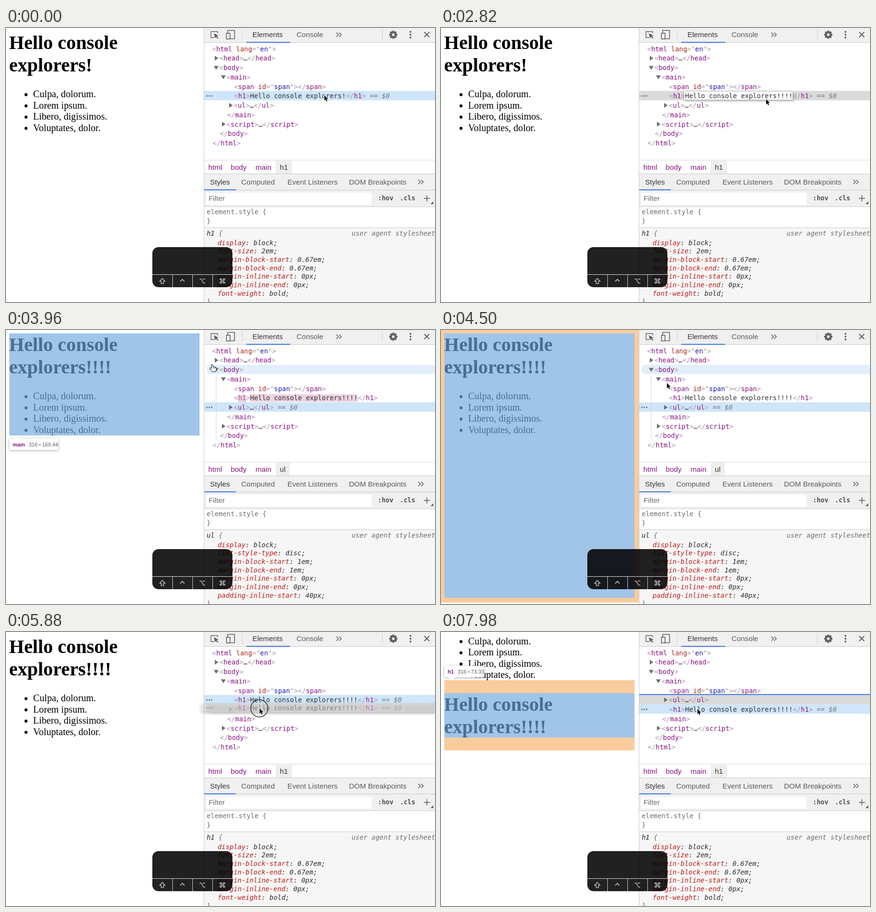
Animation, 900 px wide and 574 px high, one loop 8 s. Source, as an HTML page with a canvas:

```html
<!DOCTYPE html>
<html lang="en">
<head>
<meta charset="utf-8">
<title>Editing the DOM</title>
<style>
html, body { margin: 0; width: 100%; height: 100%; overflow: hidden; background: #fff; }
canvas { display: block; width: 900px; height: 574px; }
</style>
</head>
<body>
<canvas id="stage" width="900" height="574"></canvas>
<script>
const g = document.getElementById('stage').getContext('2d');
const LOOP = 8000, STEP = 60, LEFT = 416, ROW = 19.75, TOP = 33.75, CHAR = 8.37;
const MONO = '13.9px "DejaVu Sans Mono", monospace';
const SANS = '15.3px "Liberation Sans", Arial, sans-serif';
const SERIF = '"Liberation Serif", "Times New Roman", serif';
const CONTENT = 'rgba(111,168,220,.66)', MARGIN = 'rgba(246,178,107,.66)', PADDING = 'rgba(147,196,125,.55)';
const BAR = '#f0f0f0', EDGE = '#cacaca', BLUE = '#3b78e0';

// Moments of the story, in ms
const EDIT = 840, CARET = 1320, TYPED = [1560, 1860, 2160], COMMIT = 3240;
const GRAB = 5520, DROP = 6690, FADE = 1250;

// time, x, y of the pointer tip
const PATH = [
  [0, 668, 141], [480, 676, 144], [840, 676, 144], [2400, 676, 144], [2760, 682, 149],
  [2880, 682, 149], [3160, 640, 160], [3360, 640, 160], [3900, 432, 74], [4020, 432, 74],
  [4260, 440, 82], [4500, 474, 111], [4980, 530, 141], [5580, 531, 143], [5880, 532, 160],
  [6480, 531, 177], [7160, 531, 177], [7400, 538, 161], [8000, 538, 161]
];
// time, hovered tree row, element highlighted on the page
const HOVER = [
  [0, '', ''], [60, '', 'h1'], [720, '', ''], [3060, '', 'ul'], [3420, 'h1', 'h1'], [3600, 'span', ''],
  [3780, 'main', 'main'], [3900, 'body', 'main'], [4240, 'body', 'body'], [4560, 'main', 'main'],
  [4700, 'span', ''], [4860, 'h1', 'h1'], [5400, '', ''], [7260, '', 'main'], [7380, '', 'h1']
];
const PRESSES = [[600, 670], [740, 810], [3180, 3300], [5400, DROP]];

const between = (t, a, b) => t >= a && t < b;

function box(x, y, w, h, color) {
  g.fillStyle = color;
  g.fillRect(x, y, w, h);
}

function text(s, x, y, color, font) {
  if (font) g.font = font;
  g.fillStyle = color;
  g.fillText(s, x, y);
}

function shape(points, fill, stroke, width = 1, open = false) {
  g.beginPath();
  points.forEach(([x, y], i) => i ? g.lineTo(x, y) : g.moveTo(x, y));
  if (!open) g.closePath();
  g.lineWidth = width;
  if (stroke) { g.strokeStyle = stroke; g.stroke(); }
  if (fill) { g.fillStyle = fill; g.fill(); }
}

const line = (points, color, width) => shape(points, null, color, width, true);

function rounded(x, y, w, h, r, color) {
  g.beginPath();
  g.roundRect(x, y, w, h, r);
  g.fillStyle = color;
  g.fill();
}

function shadowed(blur, dy, alpha, draw) {
  g.save();
  g.shadowColor = `rgba(0,0,0,${alpha})`;
  g.shadowBlur = blur;
  g.shadowOffsetY = dy;
  draw();
  g.restore();
}

function pointer(t) {
  let i = PATH.findIndex(p => p[0] > t);
  if (i < 0) i = PATH.length - 1;
  const a = PATH[i - 1], b = PATH[i], k = (t - a[0]) / (b[0] - a[0]), e = k * k * (3 - 2 * k);
  return [a[1] + (b[1] - a[1]) * e, a[2] + (b[2] - a[2]) * e];
}

function stateAt(t) {
  const typed = TYPED.filter(at => t >= at).length;
  const [, row, lit] = HOVER.filter(h => h[0] <= t).pop();
  return {
    t, row, lit, swapped: t >= DROP,
    marks: '!'.repeat(1 + typed),
    pageMarks: t >= COMMIT ? '!!!!' : '!',
    selected: between(t, COMMIT, 5400) ? 'ul' : 'h1',
    editing: between(t, EDIT, COMMIT)
  };
}

function page(s) {
  const h = s.swapped ? 121 : 0, l = s.swapped ? -119.5 : 0;
  box(0, 0, 900, 574, '#fff');
  text('Hello console', 6.5, 44 + h, '#000', 'bold 40.4px ' + SERIF);
  text('explorers' + s.pageMarks, 6.5, 90.5 + h, '#000');
  g.font = '20.2px ' + SERIF;
  ['Culpa, dolorum.', 'Lorem ipsum.', 'Libero, digissimos.', 'Voluptates, dolor.'].forEach((item, i) => {
    const y = 145 + l + i * 23.5;
    text(item, 57, y, '#000');
    g.beginPath();
    g.arc(42, y - 5.3, 3.1, 0, 7);
    g.fill();
  });
}

function tooltip(tag, size, top, bottom) {
  const above = top > 40, y = above ? top - 30 : bottom + 6.5, edge = above ? y + 24 : y;
  const bold = 'bold 11px "Liberation Sans", Arial, sans-serif';
  g.font = bold;
  const x = 14 + g.measureText(tag).width + 8;
  const w = x + 27.5 + g.measureText(size).width - 6;
  shadowed(5, 1, .35, () => rounded(7, y, w, 24, 3, '#fff'));
  shape([[15, edge], [22, edge + (above ? 6 : -6)], [29, edge]], '#fff');
  text(tag, 14, y + 16, '#881280', bold);
  text('316', x, y + 16, '#5a5a5a', bold.slice(5));
  text('×', x + 20, y + 16, '#777');
  text(size, x + 28, y + 16, '#5a5a5a');
}

function highlight(s) {
  const W = 399, h = s.swapped ? 128 : 7, u = s.swapped ? 7 : 127;
  if (s.lit === 'h1') {
    box(7, h - 27, W, 27, MARGIN);
    box(7, h, W, 93, CONTENT);
    box(7, h + 93, W, 27, MARGIN);
    tooltip('h1', '73.33', h - 27, h + 120);
  } else if (s.lit === 'ul') {
    box(7, u - 20, W, 20, MARGIN);
    box(7, u, 50, 94, PADDING);
    box(57, u, W - 50, 94, CONTENT);
    tooltip('ul', '74.67', u - 20, u + 94);
  } else if (s.lit === 'main') {
    box(7, 7, W, 214, CONTENT);
    tooltip('main', '169.44', 7, 221);
  } else if (s.lit === 'body') {
    box(0, 0, LEFT, 7, MARGIN);
    box(0, 561, LEFT, 10, MARGIN);
    box(0, 7, 7, 554, MARGIN);
    box(406, 7, 10, 554, MARGIN);
    box(7, 7, W, 554, CONTENT);
  }
}

function toolbar() {
  box(LEFT, 0, 484, 30, BAR);
  box(LEFT, 30, 484, 1, EDGE);
  const ink = '#5c5f62';
  // inspect and device icons
  line([[437, 20], [430, 20], [430, 7.5], [444, 7.5], [444, 11]], ink, 1.4);
  shape([[436, 11], [446, 16], [442, 17], [445.5, 21], [444, 22.4], [440.4, 18.4], [438.5, 21.5]], ink);
  line([[465, 11], [465, 5], [479.5, 5], [479.5, 22.5], [471, 22.5]], ink, 1.6);
  g.strokeRect(462.5, 11, 7.5, 12);
  box(495, 4, 1, 20, EDGE);
  box(789, 4, 1, 20, EDGE);
  text('Elements', 517, 19, '#333', SANS);
  text('Console', 609.5, 19, '#5a5a5a');
  box(504, 29, 92, 2, BLUE);
  chevrons(693, 14);
  // settings, menu, close
  g.save();
  g.translate(812.5, 14);
  for (let i = 0; i < 8; i++) {
    g.rotate(Math.PI / 4);
    box(-2, -8.6, 4, 4, ink);
  }
  g.beginPath();
  g.arc(0, 0, 4.8, 0, 7);
  g.lineWidth = 3.8;
  g.strokeStyle = ink;
  g.stroke();
  g.restore();
  for (const y of [8, 14, 20]) {
    g.beginPath();
    g.arc(848.5, y, 1.9, 0, 7);
    g.fillStyle = ink;
    g.fill();
  }
  line([[877.5, 8.5], [888, 19]], ink, 1.9);
  line([[888, 8.5], [877.5, 19]], ink, 1.9);
}

function chevrons(x, y) {
  for (const dx of [0, 6]) line([[x + dx, y - 4.5], [x + dx + 4.5, y], [x + dx, y + 4.5]], '#5c5f62', 1.6);
}

function flash(s, tag) {
  const start = tag === 'h1' && s.t < DROP ? COMMIT : tag === 'main' || tag === 'h1' ? DROP : Infinity;
  const age = s.t - start;
  return age >= 0 && age < FADE ? 1 - age / FADE : 0;
}

function markup(src, x, y, glow = 0) {
  const put = (part, color) => {
    if (!part) return;
    text(part, x, y, color, MONO);
    x += part.length * CHAR;
  };
  const parts = /(<\/?)(\w+)(?:( \w+)(=")(\w+)("))?(>)|([^<]+)/g;
  for (const [, open, tag, name, eq, value, quote, close, plain] of src.matchAll(parts)) {
    put(open, '#a894a6');
    if (tag && glow && open === '<') {
      rounded(x - .5, y - 12, tag.length * CHAR + 1, 16, 2, `rgba(212,151,182,${glow})`);
      g.globalAlpha = 1 - .75 * glow;
    }
    put(tag, '#881280');
    g.globalAlpha = 1;
    put(name, '#a3291f');
    put(eq, '#a894a6');
    put(value, '#1a1aa6');
    put(quote, '#a894a6');
    put(close, '#a894a6');
    put(plain, '#303030');
  }
  return x;
}

function dots(y) {
  for (const x of [421.5, 426.5, 431.5]) {
    g.beginPath();
    g.arc(x, y, 1.5, 0, 7);
    g.fillStyle = '#6e6e6e';
    g.fill();
  }
}

function suffix(x, y) {
  text(' == ', x, y, '#777', MONO);
  text('$0', x + 4 * CHAR, y, '#777', 'italic ' + MONO);
}

function triangle(x, y, down) {
  shape(down ? [[x - 5, y - 3.5], [x + 5, y - 3.5], [x, y + 4.5]]
             : [[x - 3, y - 5], [x + 4.5, y], [x - 3, y + 5]], '#6e6e6e');
}

function heading(s) {
  return `<h1>Hello console explorers${s.marks}</h1>`;
}

function tree(s) {
  box(LEFT, 31, 484, 246, '#fff');
  const h1 = ['h1', 478.6, '', heading(s)], ul = ['ul', 477.8, 'right', '<ul>…</ul>'];
  const rows = [
    ['html', 432.6, '', '<html lang="en">'], ['head', 447.8, 'right', '<head>…</head>'],
    ['body', 447.8, 'down', '<body>'], ['main', 462.8, 'down', '<main>'],
    ['span', 478.6, '', '<span id="span"></span>'],
    ...(s.swapped ? [ul, h1] : [h1, ul]),
    ['', 463.8, '', '</main>'], ['script', 462.8, 'right', '<script>…</scr' + 'ipt>'],
    ['', 448.8, '', '</body>'], ['', 433.6, '', '</html>']
  ];
  rows.forEach(([tag, x, arrow, src], i) => {
    const y = TOP + i * ROW, base = y + 14.9, mid = y + 9.8, glow = flash(s, tag);
    const chosen = tag === s.selected;
    if (chosen) box(LEFT, y - .75, 484, ROW, s.editing ? '#dadada' : '#cfe5f9');
    else if (tag === 'ul' && s.swapped) box(LEFT, y - .75, 484, ROW, '#dadada');
    else if (tag && tag === s.row) rounded(421, y - .25, 490, ROW - .5, 8, '#e2eefa');
    if (chosen) dots(mid);
    if (arrow) triangle(tag === 'ul' ? 471 : x - 6.8, mid, arrow === 'down');
    if (tag === 'h1') {
      const tx = x + 4 * CHAR, tw = (23 + s.marks.length) * CHAR;
      if (s.editing) {
        shadowed(5, 1, .45, () => box(tx - 2, y + .5, tw + 5, 17.5, '#fff'));
        if (s.t < CARET) box(tx, y + 1, tw, 16.5, '#b3d7fe');
      }
      if (glow && !s.swapped) box(tx, y + 2, tw, 16, `rgba(212,151,182,${glow})`);
      if (s.editing && s.t >= CARET) box(tx + tw + .3, y + 2, 1, 15, '#222');
    }
    const end = markup(src, x, base, glow);
    if (chosen) suffix(end, base);
  });
  if (s.row === 'body') box(440.5, 94, 1, 137, '#d4d4d4');
  if (s.row === 'main') box(455.5, 114, 1, 59, '#d4d4d4');
  if (s.swapped) box(LEFT, 130, 484, 2, BLUE);
}

function crumbs(s) {
  box(LEFT, 276.5, 484, 1, EDGE);
  box(LEFT, 277.5, 484, 28, '#fff');
  box(566, 277.5, s.selected === 'h1' ? 34 : 29, 28, '#eee');
  g.font = SANS;
  [['html', 424.5], ['body', 471.5], ['main', 523.5]].forEach(([tag, x]) => text(tag, x, 297, '#881280'));
  text(s.selected, 574.5, 297, '#333');
}

function styles(s) {
  box(LEFT, 305, 484, 70, BAR);
  box(LEFT, 305, 484, 1, EDGE);
  box(LEFT, 339, 484, 1, EDGE);
  box(LEFT, 338, 66, 2, BLUE);
  [['Styles', 428], ['Computed', 493.5], ['Event Listeners', 590.5], ['DOM Breakpoints', 719.5]]
    .forEach(([label, x], i) => text(label, x, 328, i ? '#5a5a5a' : '#333', SANS));
  chevrons(865, 322.5);
  box(420, 345, 347, 25, '#fff');
  text('Filter', 425, 362, '#6b6b6b');
  const bold = 'bold 13.6px "DejaVu Sans Mono", monospace';
  text(':hov', 780, 361, '#505050', bold);
  text('.cls', 826, 361, '#505050');
  line([[876.5, 357], [889.5, 357]], '#5c5f62', 1.6);
  line([[883, 350.5], [883, 363.5]], '#5c5f62', 1.6);
  shape([[896.5, 363], [896.5, 369], [890.5, 369]], '#5c5f62');

  box(LEFT, 374, 484, 1, EDGE);
  box(LEFT, 375, 484, 43, '#fff');
  text('element.style {', 421, 389.5, '#6e6e6e', MONO);
  text('}', 421, 409, '#6e6e6e');
  box(LEFT, 418, 484, 156, '#f6f6f6');
  box(LEFT, 418, 484, 1, EDGE);
  const title = s.selected === 'h1';
  const rules = title
    ? ['display: block', 'font-size: 2em', 'margin-block-start: 0.67em', 'margin-block-end: 0.67em',
       'margin-inline-start: 0px', 'margin-inline-end: 0px', 'font-weight: bold']
    : ['display: block', 'list-style-type: disc', 'margin-block-start: 1em', 'margin-block-end: 1em',
       'margin-inline-start: 0px', 'margin-inline-end: 0px', 'padding-inline-start: 40px'];
  text(s.selected, 421, 434.5, '#222', 'italic ' + MONO);
  text('{', 421 + 3 * CHAR, 434.5, '#6e6e6e');
  text('user agent stylesheet', 725, 434.5, '#6e6e6e');
  rules.forEach((rule, i) => {
    const y = 454.7 + i * 17.65, cut = rule.indexOf(':');
    text(rule.slice(0, cut), 444, y, '#c01a1a');
    text(rule.slice(cut) + ';', 444 + cut * CHAR, y, '#2b2b2b');
  });
  text('}', 421, 578, '#6e6e6e');
}

function dragImage(s, y) {
  if (!between(s.t, GRAB, DROP)) return;
  const dy = y - 143.5, top = TOP + 5 * ROW + dy;
  const fade = g.createLinearGradient(403, 0, 432, 0);
  fade.addColorStop(0, 'rgba(214,214,214,0)');
  fade.addColorStop(1, 'rgba(214,214,214,.72)');
  shadowed(4, 2, .4, () => box(403, top, 497, ROW, fade));
  g.save();
  g.globalAlpha = .5;
  dots(top + 9.8);
  g.restore();
  // the row's text, half transparent
  g.save();
  g.beginPath();
  g.rect(LEFT, top, 484, ROW);
  g.clip();
  const end = markup(heading(s), 478.6, top + 14.9);
  suffix(end, top + 14.9);
  box(478, top, 360, ROW, 'rgba(214,214,214,.5)');
  g.restore();
}

function keys() {
  rounded(307, 459, 168, 84, 13, 'rgba(0,0,0,.87)');
  box(307, 516, 168, 1, '#e2e2e2');
  for (const x of [349, 391, 433]) box(x, 517, 1, 26, '#d0d0d0');
  const c = '#b4b4b4';
  shape([[328, 524.5], [333.5, 530.5], [330.5, 530.5], [330.5, 535.5], [325.5, 535.5], [325.5, 530.5], [322.5, 530.5]], null, c, 1.6);
  line([[365.5, 531], [370, 526.5], [374.5, 531]], c, 1.8);
  line([[406, 526], [409.5, 526], [414.5, 534.5], [418, 534.5]], c, 1.6);
  line([[412.5, 526], [418, 526]], c, 1.6);
  g.lineWidth = 1.5;
  g.strokeStyle = c;
  g.strokeRect(452, 528, 4, 4);
  for (const dx of [-1, 1]) for (const dy of [-1, 1]) {
    g.beginPath();
    g.arc(454 + dx * 3.6, 530 + dy * 3.6, 1.7, 0, 7);
    g.stroke();
  }
}

function cursor(s, x, y) {
  if (PRESSES.some(([a, b]) => between(s.t, a, b))) {
    g.beginPath();
    g.arc(x - .5, y, 18, 0, 7);
    g.lineWidth = 1.3;
    g.strokeStyle = '#222';
    g.stroke();
  }
  g.save();
  g.translate(x, y);
  g.lineJoin = 'round';
  if (between(s.t, 3880, 4260)) {
    shape([[-1, -1], [1, -1], [2, 4], [5, 3.5], [8, 4.5], [9, 6], [8.5, 10], [7, 13], [1, 13], [-2, 9], [-4, 7], [-3, 5.5], [0, 7]],
      '#fff', '#222', 2);
    line([[4, 4], [4.3, 6.5]], '#222', 1);
    line([[6.5, 4.5], [6.5, 7]], '#222', 1);
  } else {
    shape([[0, 0], [0, 11], [2.5, 8.9], [4.3, 12.8], [6.1, 12], [4.4, 8.2], [7.7, 8]], '#000', '#fff', 1.8);
  }
  g.restore();
}

function draw(t) {
  const s = stateAt(t), [x, y] = pointer(t);
  page(s);
  highlight(s);
  toolbar();
  tree(s);
  crumbs(s);
  styles(s);
  box(415, 0, 1, 574, EDGE);
  dragImage(s, y);
  keys();
  cursor(s, x, y);
}

const start = performance.now();
function tick() {
  const t = (performance.now() - start) % LOOP;
  draw(Math.floor(t / STEP) * STEP);
  requestAnimationFrame(tick);
}
tick();
</script>
</body>
</html>
```
